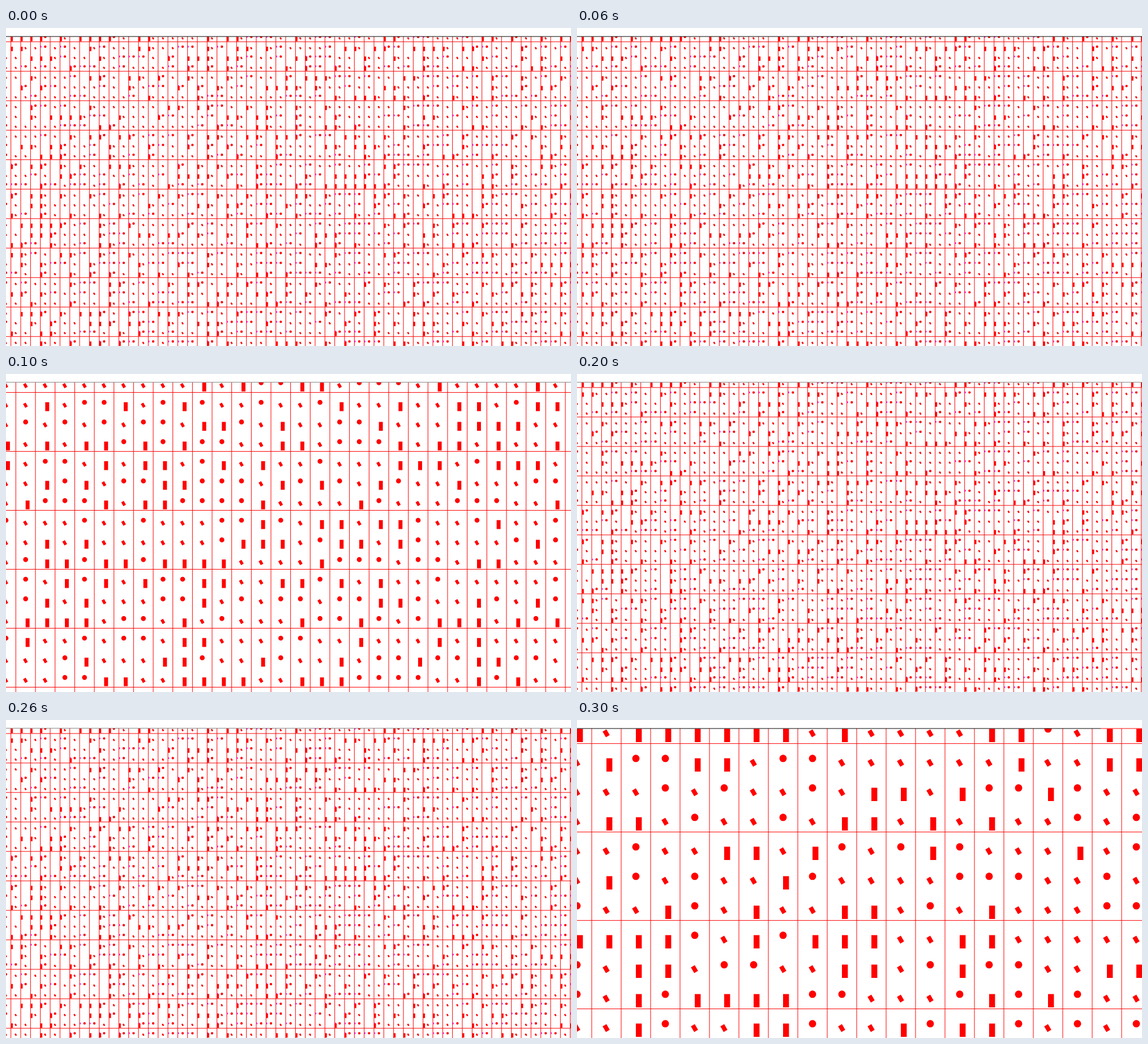
These frames come from a looping animation (998 by 561 pixels, 0.4 s). An HTML page:

```html
<!DOCTYPE html>
<html lang="en">
<head>
<meta charset="utf-8">
<title>Shape grid</title>
<style>
html, body { margin: 0; width: 100%; height: 100%; overflow: hidden; background: #fff; }
svg { display: block; width: 100%; height: 100%; }
</style>
</head>
<body>
<svg id="stage" viewBox="0 0 998 561">
  <defs><clipPath id="area"><path d="M0 15H998V561H0Z"/></clipPath></defs>
</svg>
<script>
const W = 998, H = 561, CELL = 52, STEP = 100;
const stage = document.getElementById('stage');

// top: offset of the grid, shift: sideways offset of the bars
const scenes = [
  { scale: 1 / 3, top: 15.6, seed: 11, shift: 26, dots: true, rule: '#000' },
  { scale: 2 / 3, top: 15.2, seed: 29, shift: 0, rule: '#888' },
  { scale: 1 / 3, top: 15.2, seed: 11, shift: 26, dots: true, rule: '#888' },
  { scale: 1, top: 15.6, seed: 47, shift: 0, rule: '#000', redFrom: 925 }
];

function random(seed) {
  return () => {
    seed = (seed + 0x6D2B79F5) | 0;
    let t = Math.imul(seed ^ (seed >>> 15), 1 | seed);
    t = (t + Math.imul(t ^ (t >>> 7), 61 | t)) ^ t;
    return ((t ^ (t >>> 14)) >>> 0) / 4294967296;
  };
}

const disc = (x, y, r) => `M${x - r} ${y}a${r} ${r} 0 1 1 ${2 * r} 0a${r} ${r} 0 1 1 ${-2 * r} 0z`;
const bar = (x, y, s) => `M${x} ${y}h${10.4 * s}v${23.4 * s}h${-10.4 * s}z`;
const halfDisc = (x, y, r) => `M${x} ${y - r}a${r} ${r} 0 0 1 0 ${2 * r}z`;

// a short stroke leaning 30 degrees to the left
function tick(x, y, s) {
  const w = 7.8 * s, h = 11.7 * s, c = Math.cos(Math.PI / 6), n = 0.5;
  const point = (u, v) => `${x + u * c + v * n} ${y - u * n + v * c}`;
  return `M${point(-w / 2, -h / 2)}L${point(w / 2, -h / 2)}L${point(w / 2, h / 2)}L${point(-w / 2, h / 2)}z`;
}

function build({ scale: s, top, seed, shift, dots, rule, redFrom = W }) {
  const next = random(seed), size = CELL * s;
  let shapes = '', lines = '', pink = '';
  for (let row = 0; top + row * size < H + size; row++) {
    const y = top + row * size;
    for (let col = 0; col * size < W + size; col++) {
      const x = col * size, pick = next();
      if (pick < 0.42) shapes += tick(x - 0.5 * s, y + 7.9 * s, s);
      else if (pick < 0.71) shapes += bar(x + shift * s, y, s);
      else {
        shapes += disc(x, y + 0.2 * s, 6.5 * s);
        if (dots) pink += halfDisc(x - size / 2 + 0.5, y, 1.8);
      }
    }
    if (row % 3 === 0) lines += `M0 ${y + size / 2}H${W}`;
  }
  for (let x = size / 2; x < W; x += size) lines += `M${x} 15V${H}`;
  const ruleY = rule === '#000' ? 15 : 14.5;
  return `<g clip-path="url(#area)">
    <path d="${pink}" fill="#f0f"/>
    <path d="${shapes}" fill="#f00"/>
    <path d="${lines}" stroke="#f00" fill="none"/></g>
    <path d="M0 ${ruleY}H${redFrom}" stroke="${rule}"/>
    <path d="M${redFrom} ${ruleY}H${W}" stroke="#f00"/>`;
}

const groups = scenes.map(scene => {
  const g = document.createElementNS('http://www.w3.org/2000/svg', 'g');
  g.innerHTML = build(scene);
  return stage.appendChild(g);
});

function draw(time) {
  const now = Math.floor(time / STEP) % groups.length;
  groups.forEach((g, i) => g.setAttribute('display', i === now ? 'inline' : 'none'));
}

const start = performance.now();
function loop() {
  draw(performance.now() - start);
  requestAnimationFrame(loop);
}
loop();
</script>
</body>
</html>
```
